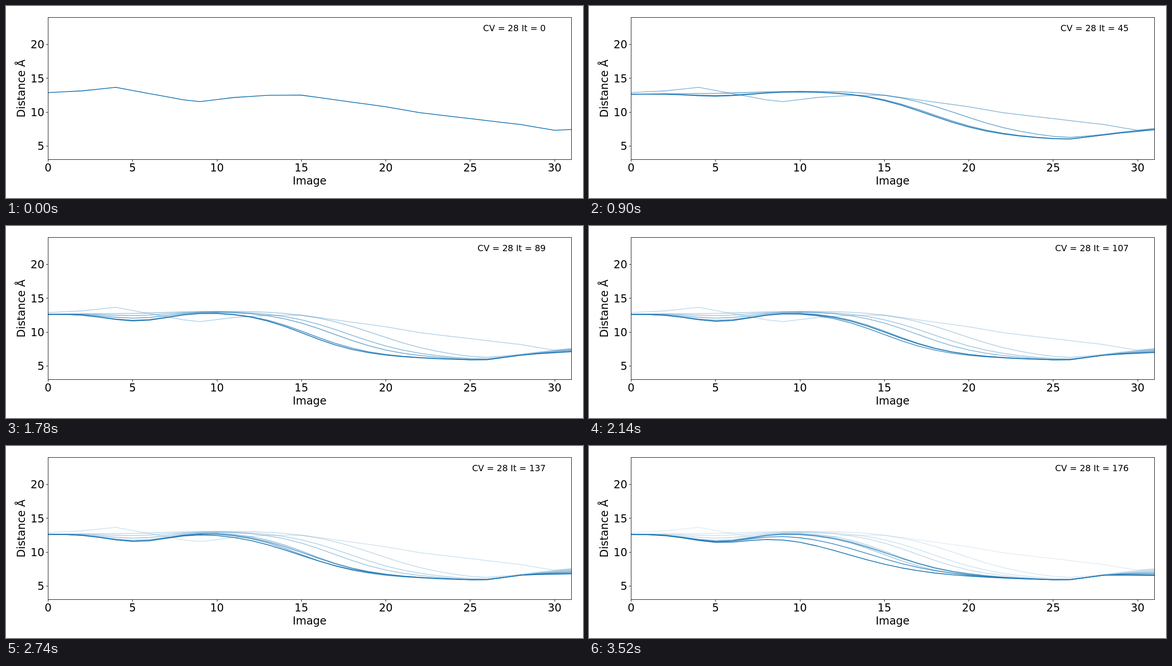
An HTML page with a canvas that plays this animation: 1280 by 427 pixels, repeating every 3.54 s.

```html
<!DOCTYPE html>
<html lang="en">
<head>
<meta charset="utf-8">
<title>Distance per image</title>
<style>
  html, body { margin: 0; width: 1280px; height: 427px; overflow: hidden; background: #fff; }
  canvas { display: block; }
</style>
</head>
<body>
<canvas id="chart" width="1280" height="427"></canvas>
<script>
const ctx = document.getElementById('chart').getContext('2d');
const STEP_MS = 20, STEPS = 177, TRAIL_EVERY = 20, FADE = 0.8;
const LEFT = 93.5, RIGHT = 1254.5, TOP = 25.5, BOTTOM = 341.5;
const px = x => LEFT + x * (RIGHT - LEFT) / 31;
const py = y => BOTTOM - (y - 3) * (BOTTOM - TOP) / 21;

const lerp = (a, b, t) => a + (b - a) * t;
const clamp = t => Math.min(1, Math.max(0, t));
const smooth = t => clamp(t) ** 2 * (3 - 2 * clamp(t));

// Straight lines through [position, value] points
function along(points, x) {
  const i = Math.max(1, points.findIndex(p => p[0] >= x));
  const [x0, y0] = points[i - 1], [x1, y1] = points[i];
  return lerp(y0, y1, clamp((x - x0) / (x1 - x0)));
}

const startPath = [[0, 12.9], [2, 13.15], [4, 13.67], [8, 11.83], [9, 11.57], [11, 12.17],
  [13, 12.5], [15, 12.52], [20, 10.8], [22, 9.93], [25, 9.05], [28, 8.17], [30, 7.33], [31, 7.45]];

// Where the curve falls, by iteration
const fallCentre = [[20, 19.1], [26, 18.4], [40, 17.5], [60, 16.65], [80, 15.2], [100, 14.65],
  [107, 15.05], [120, 15], [137, 14.45], [140, 14.95], [160, 13.75], [176, 12.4]];

// A rippled plateau that drops along a logistic step into a shallow basin
function relaxed(x, iteration) {
  const dip = 1.3 * smooth(iteration / 100) * Math.exp(-(((x - 5.3) / 2.6) ** 2));
  const plateau = 12.65 + 0.055 * x - dip;
  const tail = (0.35 - 0.0022 * iteration) * Math.max(0, x - 28);
  const basin = 5.85 + 0.06 * Math.max(0, 25.5 - x) + 0.8 * smooth((x - 25.5) / 3) + tail;
  const width = 1.8 + 0.45 * Math.abs(iteration - 90) / 70;
  const fall = 1 / (1 + Math.exp((along(fallCentre, iteration) - x) / width));
  return lerp(plateau, basin, fall);
}

function distance(x, iteration) {
  return lerp(along(startPath, x), relaxed(x, iteration), clamp(iteration / TRAIL_EVERY));
}

function drawCurve(iteration, alpha) {
  ctx.globalAlpha = alpha;
  ctx.beginPath();
  for (let x = 0; x <= 31; x++) ctx.lineTo(px(x), py(distance(x, iteration)));
  ctx.stroke();
}

function label(text, x, y, align, size = 24) {
  ctx.font = `${size}px "DejaVu Sans", sans-serif`;
  ctx.textAlign = align;
  ctx.fillText(text, x, y);
}

function drawAxes() {
  ctx.fillStyle = '#000';
  ctx.strokeStyle = '#000';
  ctx.lineWidth = 1;
  ctx.strokeRect(LEFT, TOP, RIGHT - LEFT, BOTTOM - TOP);
  for (let x = 0; x <= 30; x += 5) {
    ctx.fillRect(Math.floor(px(x)), BOTTOM + 0.5, 1, 4);
    label(x, px(x), 368, 'center');
  }
  for (let y = 5; y <= 20; y += 5) {
    ctx.fillRect(89, Math.floor(py(y)), 4, 1);
    label(y, 85, Math.round(py(y) + 8.75), 'right');
  }
  label('Image', 673.5, 397, 'center');
  ctx.save();
  ctx.translate(42, 183.5);
  ctx.rotate(-Math.PI / 2);
  label('Distance Å', 0, 0, 'center');
  ctx.restore();
}

function draw() {
  const iteration = Math.floor(performance.now() / STEP_MS) % STEPS;
  ctx.fillStyle = '#fff';
  ctx.fillRect(0, 0, 1280, 427);

  ctx.save();
  ctx.beginPath();
  ctx.rect(LEFT, TOP, RIGHT - LEFT, BOTTOM - TOP);
  ctx.clip();
  ctx.strokeStyle = '#1f77b4';
  ctx.lineWidth = 1.8;
  ctx.lineJoin = 'round';
  const trails = Math.ceil(iteration / TRAIL_EVERY);
  for (let i = 0; i < trails; i++) drawCurve(i * TRAIL_EVERY, FADE ** (trails - i));
  drawCurve(iteration, 1);
  ctx.restore();

  drawAxes();
  label(`CV = 28 It = ${iteration}`, 1197.3, 56, 'right', 19.2);
  requestAnimationFrame(draw);
}
draw();
</script>
</body>
</html>
```
